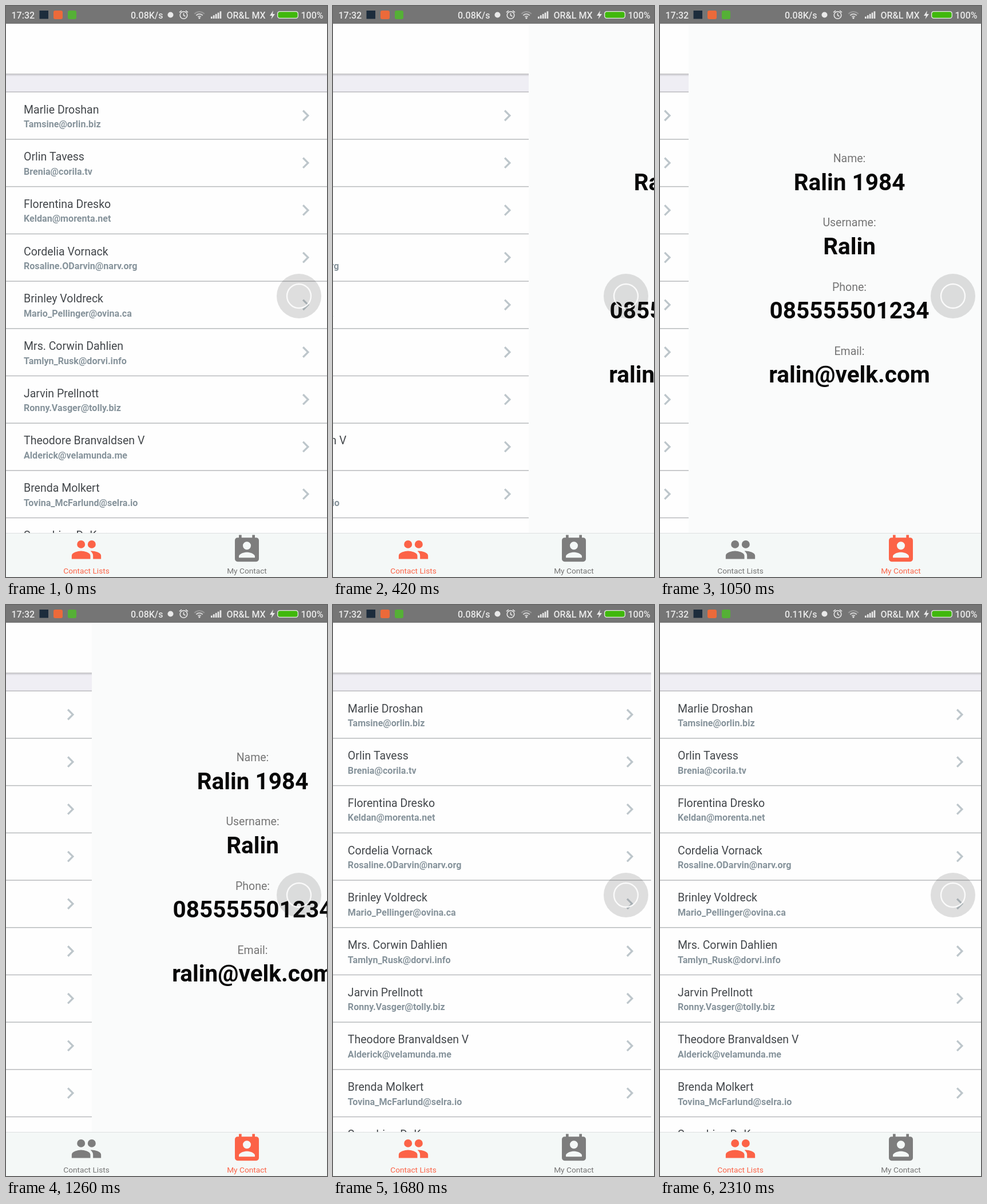
Animation of 561x998 px, one loop 2380 ms. Source, as an HTML page with a canvas:

```html
<!DOCTYPE html>
<html lang="en">
<head>
<meta charset="utf-8">
<title>Contacts</title>
<style>
html, body { margin: 0; width: 100%; height: 100%; overflow: hidden; background: #fafbfb; }
canvas { display: block; width: 561px; height: 998px; }
</style>
</head>
<body>
<canvas id="stage" width="561" height="998"></canvas>
<script>
const W = 561, H = 998, LOOP = 2380, STEP = 70;
const BAR = 31, LIST_TOP = 150, ROW = 82.7, TAB_TOP = 921;
const ACTIVE = [252, 99, 71], IDLE = [125, 125, 125];
const ctx = document.getElementById('stage').getContext('2d');

const people = [
  ['Marlie Droshan', 'Tamsine@orlin.biz'],
  ['Orlin Tavess', 'Brenia@corila.tv'],
  ['Florentina Dresko', 'Keldan@morenta.net'],
  ['Cordelia Vornack', 'Rosaline.ODarvin@narv.org'],
  ['Brinley Voldreck', 'Mario_Pellinger@ovina.ca'],
  ['Mrs. Corwin Dahlien', 'Tamlyn_Rusk@dorvi.info'],
  ['Jarvin Prellnott', 'Ronny.Vasger@tolly.biz'],
  ['Theodore Branvaldsen V', 'Alderick@velamunda.me'],
  ['Brenda Molkert', 'Tovina_McFarlund@selra.io'],
  ['Seraphina DoKarque', '']
];
const details = [
  ['Name:', 'Ralin 1984'],
  ['Username:', 'Ralin'],
  ['Phone:', '085555501234'],
  ['Email:', 'ralin@velk.com']
];

const chevron = new Path2D('M10 6L8.59 7.41 13.17 12l-4.58 4.59L10 18l6-6z');
const groupIcon = new Path2D(
  'M16 11a3 3 0 1 0 0-6a3 3 0 0 0 0 6zM8 11a3 3 0 1 0 0-6a3 3 0 0 0 0 6z' +
  'M8 13c-2.33 0-7 1.17-7 3.5V19h14v-2.5c0-2.33-4.67-3.5-7-3.5z' +
  'M16 13c-.29 0-.62.02-.97.05 1.16.84 1.97 1.97 1.97 3.45V19h6v-2.5c0-2.33-4.67-3.5-7-3.5z');
const cardIcon = new Path2D(
  'M19 3h-1V1h-2v2H8V1H6v2H5a2 2 0 0 0-2 2v14a2 2 0 0 0 2 2h14a2 2 0 0 0 2-2V5a2 2 0 0 0-2-2z' +
  'M12 6a3 3 0 1 1 0 6a3 3 0 0 1 0-6zM18 18H6v-1c0-2 4-3.1 6-3.1s6 1.1 6 3.1z');

const clamp = v => Math.max(0, Math.min(1, v));
const rgb = c => `rgb(${c.map(Math.round).join()})`;
const mix = (a, b, k) => a.map((v, i) => v + (b[i] - v) * k);

function rect(x, y, w, h, fill) {
  ctx.fillStyle = fill;
  ctx.fillRect(x, y, w, h);
}

function box(x, y, w, h, r, fill) {
  ctx.fillStyle = fill;
  ctx.beginPath();
  ctx.roundRect(x, y, w, h, r);
  ctx.fill();
}

function text(str, x, y, size, color, weight = 400, align = 'left') {
  ctx.font = `${weight} ${size}px Roboto, sans-serif`;
  ctx.textAlign = align;
  ctx.fillStyle = color;
  ctx.fillText(str, x, y);
}

function icon(path, x, y, scale, color, alpha = 1) {
  ctx.save();
  ctx.translate(x, y);
  ctx.scale(scale, scale);
  ctx.translate(-12, -12);
  ctx.globalAlpha = alpha;
  ctx.fillStyle = color;
  ctx.fill(path, 'evenodd');
  ctx.restore();
}

function arc(x, y, r, from = 0, to = Math.PI * 2) {
  ctx.beginPath();
  ctx.arc(x, y, r, from, to);
}

// A finger drag at constant speed, then a quintic settle to the next page.
function swipe(t, start, release, speed) {
  if (t < start) return 0;
  if (t < release) return (t - start) * speed;
  const rest = W - (release - start) * speed;
  return W - rest * (1 - clamp((t - release) / 375)) ** 5;
}

function pageShift(t) {
  return swipe(t, 35, 435, 219 / 385) - swipe(t, 945, 1470, 150 / 315);
}

function listPage() {
  rect(0, BAR, W, H, '#fefefe');
  rect(0, 119, W, 31, '#efeef4');
  const shade = ctx.createLinearGradient(0, 118, 0, 123);
  shade.addColorStop(0, 'rgba(0,0,0,.22)');
  shade.addColorStop(1, 'rgba(0,0,0,0)');
  rect(0, 118, W, 5, shade);
  rect(0, LIST_TOP - 0.5, W, 1.5, '#bbbbbf');
  people.forEach(([name, mail], i) => {
    const y = LIST_TOP + i * ROW;
    text(name, 31, y + 37.5, 19.5, '#43474b');
    text(mail, 31, y + 62, 16.1, '#86939b', 700);
    icon(chevron, 523.6, y + 41.5, 1.65, '#bdc6cb');
    rect(0, y + ROW - 0.5, W, 1.5, '#b8bbbd');
  });
}

function detailPage() {
  rect(0, BAR, W, H, '#fafbfb');
  details.forEach(([label, value], i) => {
    const y = 273 + i * 112.3;
    text(label, W / 2 + 0.5, y, 19.5, '#757575', 400, 'center');
    text(value, W / 2 + 0.5, y + 48.5, 40.5, '#080808', 700, 'center');
  });
}

function touchDot() {
  arc(512, 507, 39);
  ctx.fillStyle = 'rgba(40,40,40,.15)';
  ctx.fill();
  arc(512, 507, 21);
  ctx.strokeStyle = 'rgba(255,255,255,.85)';
  ctx.lineWidth = 2.4;
  ctx.stroke();
}

function tab(path, label, x, on) {
  icon(path, x, 950.2, 2.33, rgb(ACTIVE), on);
  icon(path, x, 950.2, 2.33, rgb(IDLE), 1 - on);
  text(label, x, 992, 13.7, rgb(mix([117, 117, 117], ACTIVE, on)), 400, 'center');
}

function tabBar(t) {
  const second = clamp((t - 450) / 100) - clamp((t - 1500) / 100);
  rect(0, TAB_TOP, W, H - TAB_TOP, '#f4f8f7');
  rect(0, TAB_TOP, W, 1, '#dde0e0');
  tab(groupIcon, 'Contact Lists', 140.5, 1 - second);
  tab(cardIcon, 'My Contact', 421, second);
}

function alarm(x, y) {
  ctx.lineWidth = 1.6;
  arc(x, y, 6.3);
  ctx.moveTo(x, y - 3.5);
  ctx.lineTo(x, y + 0.5);
  ctx.lineTo(x + 3, y + 2);
  for (const s of [-1, 1]) {
    ctx.moveTo(x + s * 3.6, y - 8);
    ctx.lineTo(x + s * 7.5, y - 4.8);
  }
  ctx.stroke();
}

function wifi(x, y) {
  ctx.lineWidth = 2;
  [11.5, 7.5, 3.5].forEach((r, i) => {
    ctx.strokeStyle = i ? '#d0d0d0' : '#999';
    arc(x, y, r, -Math.PI * 0.77, -Math.PI * 0.23);
    ctx.stroke();
  });
  arc(x, y - 0.5, 1.6);
  ctx.fillStyle = '#e6e6e6';
  ctx.fill();
}

function statusBar(t) {
  const ink = '#e9e9e9';
  const label = (str, x) => text(str, x, 21.5, 16, ink, 500);
  rect(0, 0, W, BAR, '#757575');
  label('17:32', 9.5);
  rect(58.5, 8, 15.5, 14.5, '#1c2c3c');
  box(83, 8, 16, 15, 3, '#ec6a3a');
  box(108, 8, 15, 15, 3, '#55b036');
  label(t < 1700 ? '0.08K/s' : '0.11K/s', 218);
  arc(287.5, 15.5, 5);
  ctx.fillStyle = ink;
  ctx.fill();
  ctx.strokeStyle = ink;
  alarm(310.5, 16);
  wifi(338, 21.5);
  for (let i = 0; i < 5; i++) {
    const h = 3.5 + i * 2.3;
    rect(358 + i * 3.9, 22 - h, 2.7, h, ink);
  }
  label('OR&L MX', 385.5);
  ctx.fillStyle = ink;
  ctx.fill(new Path2D('M467 8L461 17H465L463.5 23L470 14H466Z'));
  box(474, 9, 37, 13, 4.5, ink);
  box(475.3, 10.3, 34.4, 10.4, 3.5, '#40b80c');
  label('100%', 515.5);
}

function draw(t) {
  const shift = pageShift(t);
  ctx.save();
  ctx.translate(W - shift, 0);
  detailPage();
  ctx.restore();
  ctx.save();
  ctx.translate(-shift, 0);
  listPage();
  ctx.restore();
  tabBar(t);
  statusBar(t);
  touchDot();
}

const begin = performance.now();
function tick() {
  const t = (performance.now() - begin) % LOOP;
  draw(Math.floor(t / STEP) * STEP);
  requestAnimationFrame(tick);
}
tick();
</script>
</body>
</html>
```
